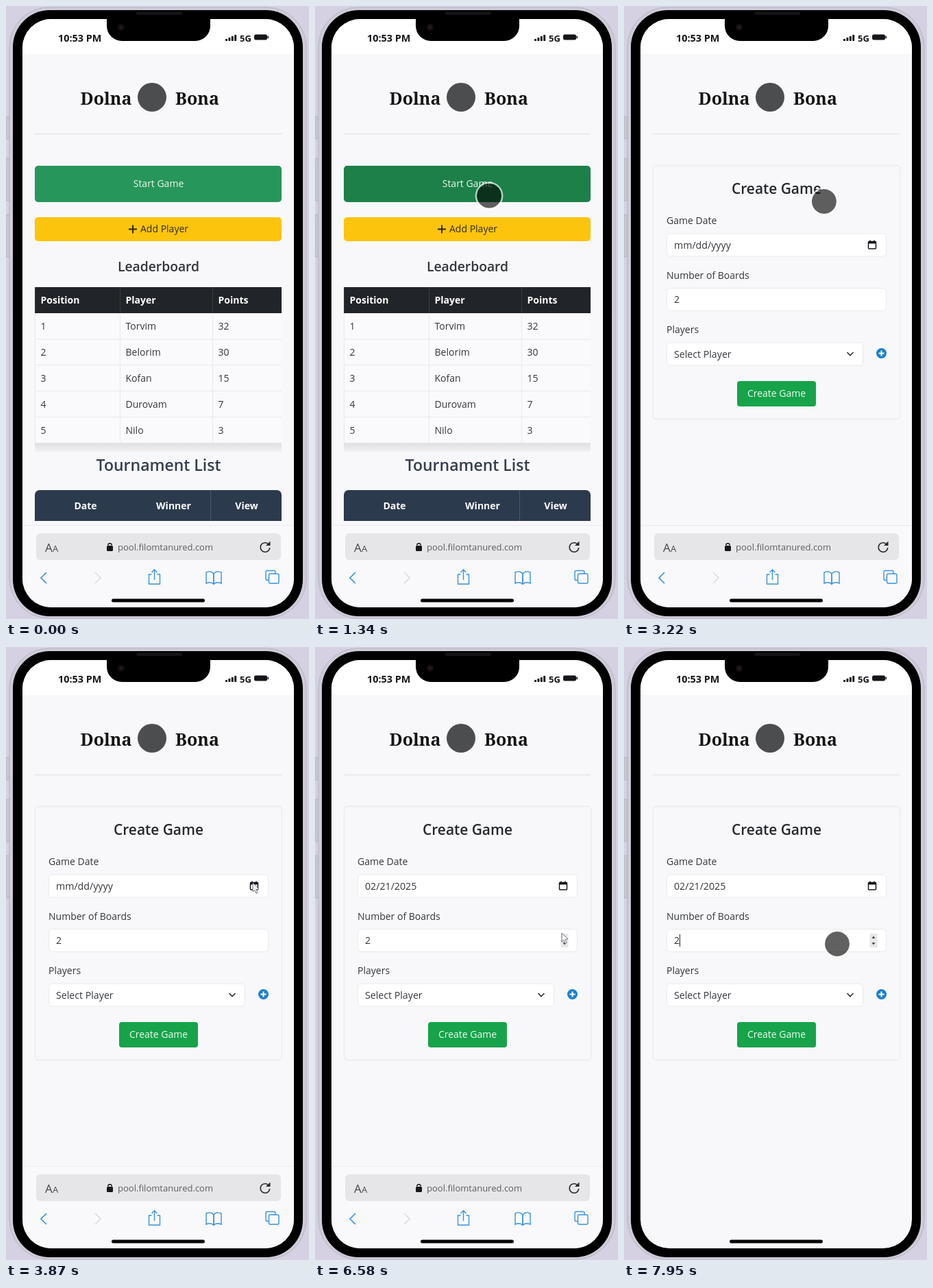
Animation of 442 by 894 pixels, one loop 7.99 s. Source, as an HTML page with a canvas:

```html
<!DOCTYPE html>
<html lang="en">
<head>
<meta charset="utf-8">
<title>Pool game tracker</title>
<style>
html, body { margin: 0; width: 100%; height: 100%; overflow: hidden; background: #d5d0e2; }
canvas { display: block; width: 442px; height: 894px; }
</style>
</head>
<body>
<canvas id="stage" width="442" height="894"></canvas>
<script>
const ctx = document.getElementById('stage').getContext('2d');
const LOOP = 7990;
const SANS = '"Open Sans", "Noto Sans", sans-serif';
const PAGE = '#f8f8fb', INK = '#33363b', RULE = '#e9e9ee', BLUE = '#3a93dc', BLACK = '#15161a';
const LEFT = 42, WIDTH = 360, MID = 222.5;
const COLUMNS = [LEFT, 166, 301];
const PAGE_SWITCH = 2540, DATE_SET = 5350, FOCUS = 7940;

const point = (x, y) => ({ x, y });
const move = (from, to, target) => ({ from, to, target });
const entry = point(412, 475);
const calendar = point(363, 352);
const spinner = point(363, 425);
const boards = point(340, 430);
const moves = [
  move(615, 1340, point(254, 277)),
  move(1340, 1440, point(259, 254)),
  move(3015, 3630, calendar),
  move(4385, 4530, point(340, 389)),
  move(DATE_SET, DATE_SET, point(270, 581)),
  move(DATE_SET, 5900, point(341, 422)),
  move(6445, 6580, spinner),
  move(6995, 7300, point(340, 498)),
  move(7505, 7610, boards),
  move(7715, 7910, point(311, 433))
];

const clamp = k => Math.min(1, Math.max(0, k));
const mix = (a, b, k) => a + (b - a) * k;
// Mostly steady travel with slightly softened ends
const ease = k => mix(k, k * k * (3 - 2 * k), 0.25);

function pointerAt(t) {
  let at = entry;
  for (const { from, to, target } of moves) {
    if (t < from) break;
    const k = to > from ? ease(clamp((t - from) / (to - from))) : 1;
    at = point(mix(at.x, target.x, k), mix(at.y, target.y, k));
  }
  return at;
}

const near = (a, b) => Math.hypot(a.x - b.x, a.y - b.y) < 8;

function paint(fill, stroke, lineWidth) {
  if (fill) { ctx.fillStyle = fill; ctx.fill(); }
  if (stroke) { ctx.strokeStyle = stroke; ctx.lineWidth = lineWidth; ctx.stroke(); }
}

function box(x, y, w, h, r, fill, stroke, lineWidth = 1) {
  ctx.beginPath();
  ctx.roundRect(x, y, w, h, r);
  paint(fill, stroke, lineWidth);
}

function arc(x, y, r, from, to, fill, stroke, lineWidth) {
  ctx.beginPath();
  ctx.arc(x, y, r, from, to);
  paint(fill, stroke, lineWidth);
}

const disc = (x, y, r, fill) => arc(x, y, r, 0, Math.PI * 2, fill);

function line(color, width, ...points) {
  ctx.beginPath();
  points.forEach(([x, y]) => ctx.lineTo(x, y));
  paint(null, color, width);
}

function shape(fill, ...points) {
  ctx.beginPath();
  points.forEach(([x, y]) => ctx.lineTo(x, y));
  ctx.closePath();
  paint(fill);
}

function plus(x, y, r, color) {
  line(color, 2, [x - r, y], [x + r, y]);
  line(color, 2, [x, y - r], [x, y + r]);
}

function chevron(x, y, dx, dy, color, width = 1.7) {
  line(color, width, [x - dx, y - Math.abs(dy)], [x + (dy > 4.5 ? dx : 0), y + (dy > 4.5 ? 0 : dy)],
    dy > 4.5 ? [x - dx, y + dy] : [x + dx, y - dy]);
}

// y is the middle of the capital letters
function text(str, x, y, { size = 14, weight = 400, color = INK, align = 'left', family = SANS } = {}) {
  ctx.font = `${weight} ${size}px ${family}`;
  ctx.textAlign = align;
  ctx.fillStyle = color;
  ctx.fillText(str, x, y + size * 0.357);
}

const title = (str, y, size, color = INK) => text(str, MID, y, { size, weight: 600, color, align: 'center' });

function onScreen(draw) {
  ctx.save();
  ctx.beginPath();
  ctx.roundRect(24, 19, 396, 858, 42);
  ctx.clip();
  draw();
  ctx.restore();
}

function drawPhone() {
  ctx.fillStyle = '#d5d0e2';
  ctx.fillRect(0, 0, 442, 894);
  for (const y of [161, 222, 304]) box(0, y, 5, y < 200 ? 33 : 62, 2, '#c9c6d3', '#b5b2c0');
  box(5, 2, 433, 891, 58, '#cfccd8', '#b7b5c0');
  box(10, 6, 423, 884, 54, '#000');
  box(190, 8, 67, 5, 2.5, '#141416');
}

function drawStatusBar() {
  ctx.fillStyle = '#fff';
  ctx.fillRect(24, 19, 396, 51);
  box(147, 15, 151, 36, [0, 0, 22, 22], '#000');
  disc(168, 31, 5, '#15100f');
  disc(168, 31, 2, '#2c1c1a');
  text('10:53 PM', 76, 47, { size: 14.4, weight: 700, color: BLACK });
  for (let i = 0; i < 4; i++) box(320 + i * 4.4, 48 - i * 2, 3, 3 + i * 2, 0.8, BLACK);
  text('5G', 341, 47, { size: 13, weight: 700, color: BLACK });
  box(362, 41.5, 19, 8, 2.5, BLACK);
  box(381.5, 43.5, 1.5, 4, 1, BLACK);
}

function drawBrand() {
  const style = { size: 25, weight: 700, color: '#141414', align: 'center', family: '"Noto Serif", serif' };
  text('Dolna', 146, 135, style);
  text('Bona', 279, 135, style);
  disc(213, 133, 21, '#4b4d4f');
  line('#e4e4ea', 1.5, [LEFT, 186.5], [LEFT + WIDTH, 186.5]);
}

function drawHome(t) {
  const hover = clamp((t - 1160) / 150);
  const [r, g, b] = [[39, 28], [150, 128], [90, 72]].map(([from, to]) => mix(from, to, hover));
  box(LEFT, 233, WIDTH, 53, 5, `rgb(${r}, ${g}, ${b})`);
  text('Start Game', MID, 259, { color: '#edf7f1', align: 'center' });

  box(LEFT, 308, WIDTH, 35, 5, '#fcc40d');
  plus(185, 325.5, 6, '#2b2820');
  text('Add Player', 196, 325.5, { color: '#302d24' });

  title('Leaderboard', 380, 19.3);
  const shadow = ctx.createLinearGradient(0, 637, 0, 650);
  shadow.addColorStop(0, '#dddde2');
  shadow.addColorStop(1, '#f2f2f5');
  box(LEFT, 637, WIDTH, 13, 0, shadow);
  box(LEFT, 448, WIDTH, 189, 0, '#fafafc');
  box(LEFT, 410, WIDTH, 38, 0, '#212529');
  const rows = [['Torvim', 32], ['Belorim', 30], ['Kofan', 15], ['Durovam', 7], ['Nilo', 3]];
  ['Position', 'Player', 'Points'].forEach((label, i) => {
    const x = COLUMNS[i];
    text(label, x + 8.5, 429.5, { weight: 700, color: '#fff' });
    line('#373b40', 1, [x + 0.5, 410], [x + 0.5, 448]);
    line(RULE, 1, [x + 0.5, 448], [x + 0.5, 637]);
  });
  rows.forEach(([name, points], i) => {
    const y = 467.5 + i * 37.8;
    [i + 1, name, points].forEach((value, c) => text(value, COLUMNS[c] + 8.5, y));
    line(RULE, 1, [LEFT, y + 18.5], [LEFT + WIDTH, y + 18.5]);
  });

  title('Tournament List', 669.5, 23, '#343f4d');
  box(LEFT, 706, WIDTH, 45, [7, 7, 0, 0], '#2c3a4d');
  line('#4a596c', 1, [298.5, 706], [298.5, 751]);
  const heading = { weight: 700, color: '#fff', align: 'center' };
  text('Date', 116, 729, heading);
  text('Winner', 244.5, 729, heading);
  text('View', 351, 729, heading);
}

function drawField(label, value, y, width = 320) {
  text(label, 62, y - 35);
  box(62.5, y - 16.5, width, 33, 5, '#fff', RULE);
  text(value, 73, y, { size: 14.2 });
}

function drawCalendar(x, y) {
  box(x - 5.5, y - 5, 11, 10.5, 1, null, BLACK, 1.5);
  box(x - 6, y - 5.5, 12, 3.5, 1, BLACK);
  for (const dx of [-3, 3]) line(BLACK, 1.5, [x + dx, y - 7], [x + dx, y - 4]);
}

function drawSpinner(x, y) {
  box(x - 5.5, y - 10, 11, 20, 1, '#e7e7eb');
  for (const d of [-1, 1]) shape('#45474c', [x - 2.5, y + d * 3], [x, y + d * 6.5], [x + 2.5, y + d * 3]);
}

function drawForm(t, pointer) {
  box(LEFT + 0.5, 232.5, WIDTH, 370, 5, null, RULE, 1.3);
  title('Create Game', 267, 20.9, '#25282d');

  drawField('Game Date', t < DATE_SET ? 'mm/dd/yyyy' : '02/21/2025', 348.5);
  drawCalendar(362, 348.5);

  drawField('Number of Boards', '2', 428);
  if (Math.abs(pointer.y - 428) < 17) drawSpinner(364, 428);
  if (t >= FOCUS) line('#222', 1, [81.5, 419], [81.5, 437]);

  drawField('Players', 'Select Player', 507.5, 286);
  line(INK, 1.7, [325.5, 505], [330, 509.5], [334.5, 505]);
  disc(375.5, 506.5, 7.5, '#1c7fd0');
  plus(375.5, 506.5, 4, '#fff');

  box(165, 547, 115, 37, 4, '#16a34a');
  text('Create Game', MID, 565.5, { color: '#f1faf4', align: 'center' });
}

function drawReload(x, y) {
  arc(x, y, 6.8, 0.1, Math.PI * 1.75, null, '#26272b', 1.6);
  shape('#26272b', [x + 7.5, y - 9], [x + 7.5, y - 2.5], [x + 1, y - 2.5]);
}

function drawShare(x, y) {
  line(BLUE, 1.4, [x - 4, y - 4], [x - 8, y - 4], [x - 8, y + 10], [x + 8, y + 10], [x + 8, y - 4], [x + 4, y - 4]);
  line(BLUE, 1.4, [x, y + 4], [x, y - 11]);
  line(BLUE, 1.4, [x - 4, y - 7], [x, y - 11], [x + 4, y - 7]);
}

function drawBook(x, y) {
  for (const side of [-1, 1]) {
    ctx.beginPath();
    ctx.moveTo(x, y - 6);
    ctx.quadraticCurveTo(x + side * 4, y - 11, x + side * 11, y - 8);
    ctx.lineTo(x + side * 11, y + 8);
    ctx.quadraticCurveTo(x + side * 5, y + 5, x, y + 9);
    ctx.closePath();
    paint(null, BLUE, 1.4);
  }
}

function drawToolbar() {
  ctx.fillStyle = '#f9f9fc';
  ctx.fillRect(24, 757, 396, 120);
  line('#ebebef', 1, [24, 757.5], [420, 757.5]);
  box(44, 769, 357, 39, 6, '#e6e6e9');
  text('A', 57, 789.5, { size: 17, color: '#44464b' });
  text('A', 68, 791, { size: 13, color: '#44464b' });
  box(147, 787, 9, 8, 1.5, BLACK);
  arc(151.5, 786.5, 2.8, Math.PI, 0, null, BLACK, 1.5);
  text('pool.filomtanured.com', 163, 789, { size: 13, color: '#5b5d62' });
  drawReload(378, 789.5);

  line(BLUE, 1.7, [59, 826], [51, 834], [59, 842]);
  line('#d9dbe2', 1.5, [130, 826], [138, 834], [130, 842]);
  drawShare(216.5, 833);
  drawBook(303, 834);
  box(379, 823.5, 14, 14, 2, null, BLUE, 1.4);
  box(383.5, 828, 14.5, 14, 2, '#f9f9fc', BLUE, 1.4);
}

function drawArrow(x, y) {
  const outline = [[x, y], [x, y + 13], [x + 3, y + 10.5], [x + 5, y + 15.5],
    [x + 7, y + 14.5], [x + 5, y + 9.5], [x + 9, y + 9]];
  shape('#f4f4f6', ...outline);
  line('#77797e', 1, ...outline, outline[0]);
}

function drawPointer(at, onForm) {
  if (onForm && (near(at, calendar) || near(at, spinner))) {
    drawArrow(at.x - 3, at.y - 8);
    return;
  }
  disc(at.x, at.y, 18, 'rgba(0, 0, 0, .62)');
  arc(at.x, at.y, 19.2, 0, Math.PI * 2, null, 'rgba(255, 255, 255, .65)', 2.4);
}

function render(t) {
  const pointer = pointerAt(t);
  const onForm = t >= PAGE_SWITCH;
  drawPhone();
  onScreen(() => {
    ctx.fillStyle = PAGE;
    ctx.fillRect(24, 19, 396, 858);
    drawStatusBar();
    drawBrand();
    if (onForm) drawForm(t, pointer);
    else drawHome(t);
    if (t < FOCUS) drawToolbar();
    box(154, 864.5, 136, 5, 2.5, '#050505');
    if (t >= moves[0].from) drawPointer(pointer, onForm);
  });
}

const start = performance.now();
function tick() {
  render((performance.now() - start) % LOOP);
  requestAnimationFrame(tick);
}
tick();
</script>
</body>
</html>
```
